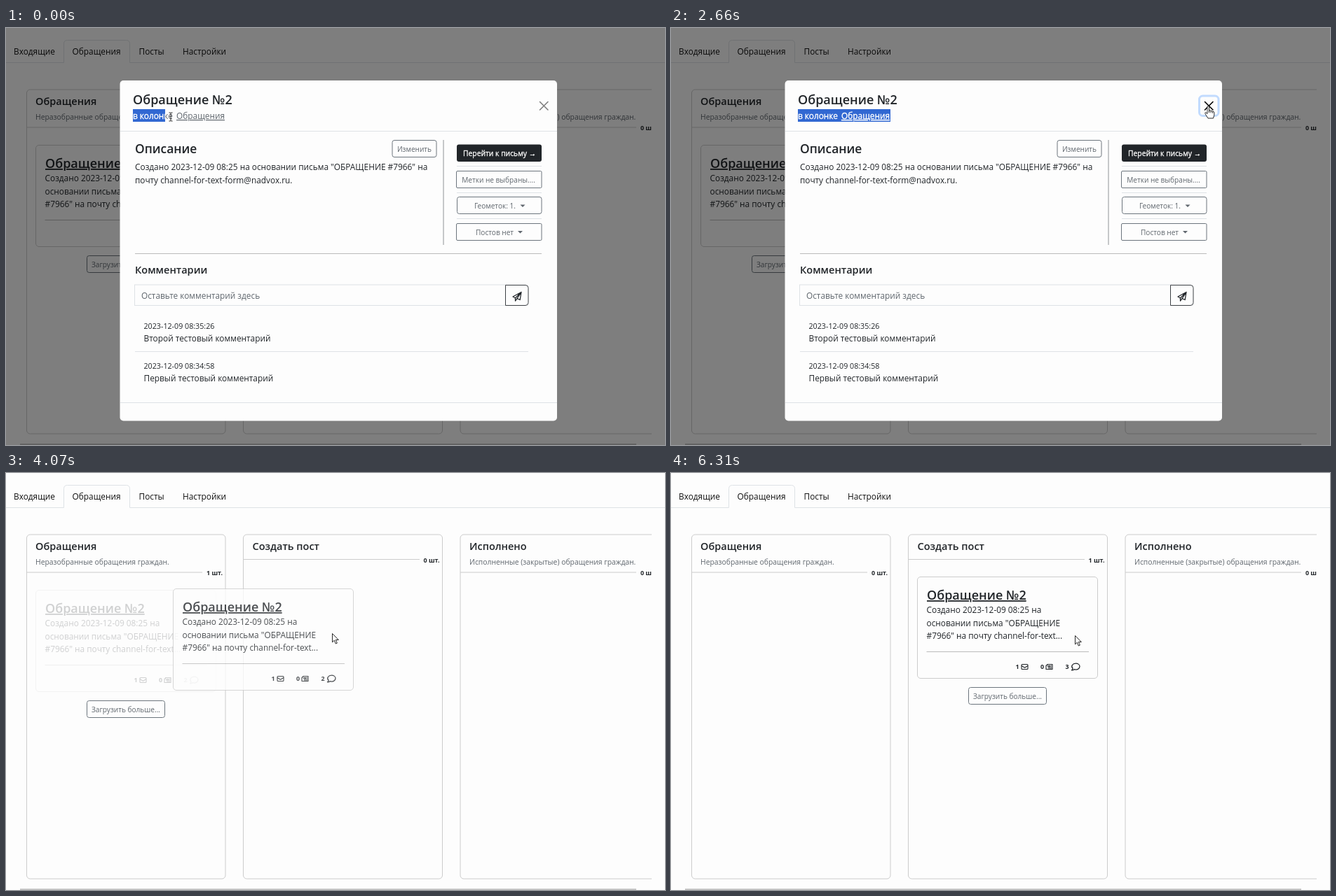
Write an HTML page that moves like this. It is 940x596 px and loops after 8 s.

```html
<!DOCTYPE html>
<html lang="ru">
<head>
<meta charset="utf-8">
<title>Обращения</title>
<style>
html, body { margin: 0; width: 100%; height: 100%; overflow: hidden; background: #fdfdfd; }
svg { position: absolute; left: 0; top: 0; display: block; }
text { font: 11.85px "Open Sans", "Noto Sans", sans-serif; white-space: pre; }
.h1 { font-size: 18px; font-weight: 600; }
.h2 { font-size: 14.5px; font-weight: 600; }
.part { font-size: 17.4px; }
.sm { font-size: 10.35px; }
.label { font-size: 10.1px; }
.date { font-size: 10.7px; }
.num { font-size: 8.9px; font-weight: 700; }
.u { text-decoration: underline; }
.mid { text-anchor: middle; }
.end { text-anchor: end; }
.muted { fill: #60676e; }
.line { fill: none; stroke: #ccc; }
.faint { fill: none; stroke: #dee2e6; }
.btn { fill: #fdfdfd; stroke: #6c757d; }
.ico { fill: none; stroke: #212529; stroke-width: 1.1; stroke-linejoin: round; }

/* one loop is 8 s, every change is a hard step */
.a { animation: 8s step-end infinite; }
.modal { animation-name: modal; }
.ring { animation-name: ring; }
.cross { animation-name: cross; }
.sel { animation-name: sel; }
.cursor { animation-name: cursor; }
.beam { animation-name: beam; }
.arrow { animation-name: arrow; }
.hand { animation-name: hand; }
.first { animation-name: first; }
.drag { animation-name: drag; }
.second { animation-name: second; }
.more { animation-name: more; }
.before { animation-name: before; }
.after { animation-name: after; }

.sel {
  position: absolute; left: 181px; top: 116px; height: 18px;
  overflow: hidden; background: #3168d2;
}
.sel text { fill: #fff; stroke: #fff; stroke-width: .35px; }

@keyframes modal { 0% { opacity: 1 } 36.75%, to { opacity: 0 } }
@keyframes ring { 0% { opacity: 0 } 33.25% { opacity: 1 } 36.75%, to { opacity: 0 } }
@keyframes cross { 0% { stroke: #7f7f7f } 27%, to { stroke: #000 } }
@keyframes sel {
  0% { width: 46px } 1.5% { width: 62px } 3% { width: 87px } 4.5% { width: 110px }
  6% { width: 125px } 7.5% { width: 132px } 36.75%, to { width: 0 }
}
@keyframes cursor {
  0% { transform: translate(235px, 127px) }
  1.5% { transform: translate(252px, 127px) }
  3% { transform: translate(272px, 128px) }
  4.5% { transform: translate(292px, 128px) }
  6% { transform: translate(308px, 128px) }
  7.5% { transform: translate(318px, 127px) }
  19.25% { transform: translate(381px, 127px) }
  21% { transform: translate(430px, 126px) }
  22.5% { transform: translate(530px, 122px) }
  24% { transform: translate(635px, 117px) }
  25.5% { transform: translate(722px, 113px) }
  27% { transform: translate(766px, 111px) }
  38.25% { transform: translate(640px, 140px) }
  39.75% { transform: translate(420px, 195px) }
  41.25% { transform: translate(278px, 231px) }
  43% { transform: translate(288px, 231px) }
  44.5% { transform: translate(306px, 230px) }
  46% { transform: translate(330px, 229px) }
  47.5% { transform: translate(352px, 227px) }
  49.375% { transform: translate(398px, 227px) }
  50.875% { transform: translate(465px, 229px) }
  52.375% { transform: translate(530px, 231px) }
  53.875% { transform: translate(575px, 233px) }
  74.25%, to { transform: translate(576px, 232px) }
}
@keyframes beam { 0% { opacity: 1 } 7.5%, to { opacity: 0 } }
@keyframes arrow { 0% { opacity: 0 } 7.5% { opacity: 1 } 27% { opacity: 0 } 36.75%, to { opacity: 1 } }
@keyframes hand { 0% { opacity: 0 } 27% { opacity: 1 } 36.75%, to { opacity: 0 } }
@keyframes first { 0% { opacity: 1 } 43% { opacity: .2 } 52.375%, to { opacity: 0 } }
@keyframes drag {
  0% { opacity: 0; transform: translate(42px, 167px) }
  43% { opacity: .8; transform: translate(52px, 167px) }
  44.5% { opacity: .8; transform: translate(70px, 166px) }
  46% { opacity: .8; transform: translate(94px, 165px) }
  47.5% { opacity: .8; transform: translate(116px, 163px) }
  49.375% { opacity: .8; transform: translate(165px, 163px) }
  50.875% { opacity: .8; transform: translate(238px, 165px) }
  52.375% { opacity: .8; transform: translate(308px, 167px) }
  53.875% { opacity: .8; transform: translate(355px, 168px) }
  74.25%, to { opacity: 0; transform: translate(355px, 168px) }
}
@keyframes second { 0% { opacity: 0 } 52.375% { opacity: .08 } 74.25%, to { opacity: 1 } }
@keyframes more {
  0% { transform: none }
  52.375% { transform: translate(0, -158px) }
  78.875%, to { transform: translate(309px, -19px) }
}
@keyframes before { 0% { opacity: 1 } 78.875%, to { opacity: 0 } }
@keyframes after { 0% { opacity: 0 } 78.875%, to { opacity: 1 } }
</style>
</head>
<body>
<svg width="940" height="596" fill="#212529">
  <defs>
    <clipPath id="board"><path d="M0 0H921V596H0z"/></clipPath>
    <g id="card">
      <rect x=".5" y=".5" width="257" height="145" rx="4.5" fill="#fdfdfd" stroke="#ccc"/>
      <text class="h1 u" x="14" y="33">Обращение №2</text>
      <text x="13.5" y="52">Создано 2023-12-09 08:25 на</text>
      <text x="13.5" y="70.7">основании письма "ОБРАЩЕНИЕ</text>
      <text x="13.5" y="89.4">#7966" на почту channel-for-text...</text>
      <path class="line" style="stroke:#bbb" d="M13.5 107.5H245"/>
      <text class="num" x="140.5" y="132">1</text>
      <rect class="ico" x="149" y="125.5" width="9" height="7" rx="1"/>
      <path class="ico" d="M149 127.5l4.5 2.8 4.5-2.8"/>
      <text class="num" x="176" y="132">0</text>
      <path class="ico" d="M185.500 125.500h7.500v7h-9v-5.500h1.500z"/>
      <path class="ico" d="M187 127.500h2.500v1.800H187zM190.500 127.500h1.500M190.500 129.300h1.500M187 131h5"/>
      <path class="ico" style="stroke-width:1.3" d="M220.500 133.800c1-.7 1.500-1.600 1.600-2.600-3.200-3.200-.2-7 4.200-7 3.400 0 5.700 2 5.700 4.400 0 3.300-4 5.200-7.700 4.100-1 .7-2.300 1.100-3.800 1.100z"/>
    </g>
    <g id="sub">
      <text x="181" y="130">в колонке</text>
      <text class="u" x="243" y="130">Обращения</text>
    </g>
  </defs>

  <path class="faint" d="M0 49.5H82.5V22.5q0-5 5-5H171.5q5 0 5 5V49.5H940"/>
  <g fill="#111">
    <text x="11" y="38">Входящие</text>
    <text x="94.5" y="38">Обращения</text>
    <text x="189.5" y="38">Посты</text>
    <text x="252" y="38">Настройки</text>
  </g>

  <g clip-path="url(#board)">
    <g class="line">
      <rect x="29.5" y="88" width="283.5" height="492" rx="5"/>
      <rect x="338.5" y="88" width="284" height="492" rx="5"/>
      <rect x="648" y="88" width="284" height="492" rx="5"/>
      <path d="M30 142H280M339 123.5H590M648 142H899"/>
    </g>
    <text class="h2" x="42" y="110">Обращения</text>
    <text class="h2" x="351.5" y="110">Создать пост</text>
    <text class="h2" x="661" y="110">Исполнено</text>
    <text class="sm muted" x="42" y="131">Неразобранные обращения граждан.</text>
    <text class="sm muted" x="661" y="131">Исполненные (закрытые) обращения граждан.</text>
    <g class="a before">
      <text class="num end" x="309" y="146">1 шт.</text>
      <text class="num end" x="618.5" y="127.5">0 шт.</text>
    </g>
    <g class="a after">
      <text class="num end" x="309" y="146">0 шт.</text>
      <text class="num end" x="618.5" y="127.5">1 шт.</text>
    </g>
    <text class="num" x="905" y="146">0 шт.</text>
  </g>
  <path d="M20 595H899" stroke="#b5b5b5" stroke-width="1.5"/>

  <g class="a more">
    <rect class="btn" x="115.5" y="325.5" width="111" height="24" rx="3"/>
    <text class="label muted mid" x="171" y="342">Загрузить больше...</text>
  </g>
  <g transform="translate(42 167)">
    <g class="a first">
      <use href="#card"/>
      <text class="num" x="211.5" y="132">2</text>
    </g>
  </g>
  <g transform="translate(351 148)">
    <g class="a second">
      <use href="#card"/>
      <text class="num a before" x="211.5" y="132">2</text>
      <text class="num a after" x="211.5" y="132">3</text>
    </g>
  </g>
  <g class="a drag">
    <use href="#card"/>
    <text class="num" x="211.5" y="132">2</text>
  </g>

  <g class="a modal">
    <path d="M0 0H940V596H0z" fill="#000" opacity=".5"/>
    <rect x="162.5" y="75" width="623.5" height="486.5" rx="5" fill="#fdfdfd"/>
    <path class="faint" d="M163 147.5H786M163 535.5H786M184 462.5H745M643 197.5H764M643 235.5H764M643 272.5H764"/>
    <path class="line" d="M184 322.5H764" style="stroke:#bbb"/>
    <path class="line" d="M624 160V310" style="stroke:#909296"/>

    <text class="h1" x="181" y="109">Обращение №2</text>
    <use href="#sub" fill="#60676e"/>
    <rect class="a ring" x="753.5" y="97" width="27.5" height="28.5" rx="5" fill="none" stroke="#c2dbfe" stroke-width="3"/>
    <path class="a cross" d="M761.5 105.5l11.5 11.5M773 105.5l-11.5 11.5" stroke-width="1.6" stroke-linecap="round"/>

    <text class="h1 part" x="184" y="179">Описание</text>
    <text x="184" y="203">Создано 2023-12-09 08:25 на основании письма "ОБРАЩЕНИЕ #7966" на</text>
    <text x="184" y="221.5">почту channel-for-text-form@nadvox.ru.</text>

    <g class="btn">
      <rect x="551" y="160.5" width="63" height="24" rx="3"/>
      <rect x="642.5" y="204.5" width="121.5" height="24" rx="1.5"/>
      <rect x="643.5" y="241.5" width="120.5" height="24" rx="3"/>
      <rect x="642.5" y="279.5" width="121.5" height="24" rx="1.5"/>
    </g>
    <rect x="643" y="166.5" width="121" height="24.5" rx="3"/>
    <text class="sm" x="652" y="183" fill="#fff" stroke="#fff" stroke-width=".3">Перейти к письму →</text>
    <g class="muted mid">
      <text class="label" x="582.5" y="177">Изменить</text>
      <text class="label" x="702.5" y="220.5">Метки не выбраны....</text>
      <text class="label" x="697.5" y="258">Геометок: 1.</text>
      <text class="label" x="697" y="295.5">Постов нет</text>
      <path d="M733.5 252.5h7l-3.5 3.5zM730 290h7l-3.5 3.5z"/>
    </g>

    <text class="h2" x="184" y="351">Комментарии</text>
    <rect class="faint" x="183.5" y="367" width="529.5" height="29.5"/>
    <text class="muted" x="193" y="386.5">Оставьте комментарий здесь</text>
    <path d="M712.5 367.5H741q4 0 4 4V392.5q0 4-4 4H712.5z" fill="#fdfdfd" stroke="#3c4045"/>
    <path class="ico" style="stroke-width:1.3" d="M735 377.5l-12 6.5 3.5 2L735 377.5l-1.800 11-4.200-1.800zM726.500 386v4l2.500-3.300"/>

    <text class="date" x="196.5" y="429.5">2023-12-09 08:35:26</text>
    <text x="196.5" y="448">Второй тестовый комментарий</text>
    <text class="date" x="196.5" y="486.5">2023-12-09 08:34:58</text>
    <text x="196.5" y="505">Первый тестовый комментарий</text>
  </g>
</svg>

<div class="a sel"><svg width="140" height="18" viewBox="181 116 140 18">
  <text x="181" y="130">в колонке</text>
  <text class="u" x="243" y="130">Обращения</text>
</svg></div>

<svg width="940" height="596">
  <g class="a cursor" fill="#fff" stroke="#111" stroke-width=".9" stroke-linejoin="round">
    <path class="a beam" fill="none" d="M-2.5-6H-.5L0-5.5.5-6H2.5M0-5.5V5.5M-2.5 6H-.5L0 5.5.5 6H2.5"/>
    <path class="a arrow" d="M.5.5V12.8L3.3 10.2 5.3 15 7.3 14.1 5.3 9.5H9.3z"/>
    <path class="a hand" d="M-1 2q0-1.500 1.200-1.500T1.500 2V7q2-.8 2.500.6 2-.6 2.400.7Q8.800 8 8.800 10v3.500L7.500 18H0l-3.500-5.500Q-5 10-3.500 9.500L-1 11.500zM1.500 7V10M4 7.600V10.300M6.400 8.300V10.700"/>
  </g>
</svg>
</body>
</html>
```
